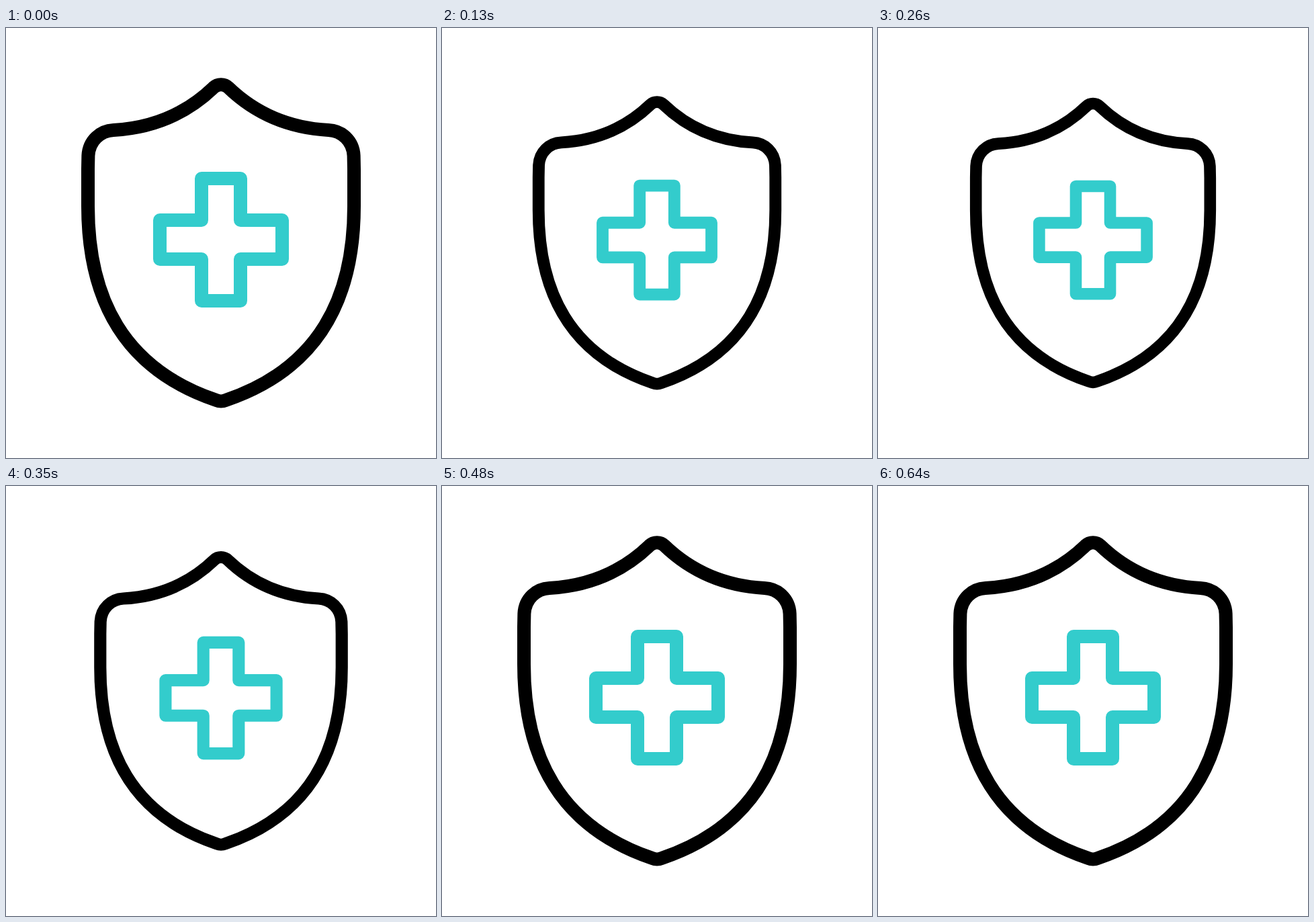
These frames come from a looping animation (640 by 640 pixels, 1510 ms). An HTML page:

```html
<!DOCTYPE html>
<html lang="en">
<head>
<meta charset="utf-8">
<title>Shield pulse</title>
<style>
  html, body { margin: 0; width: 100%; height: 100%; overflow: hidden; background: #fff; }
  svg { display: block; width: 100%; height: 100%; }
</style>
</head>
<body>
<svg viewBox="0 0 640 640">
  <g id="icon" fill="none" stroke-width="20" stroke-linejoin="round" stroke-linecap="round">
    <path stroke="#000" d="M309 88.6 C266 130 215 149 160 152 C140 153 123.5 168 122.4 190
      L122 210 V265 C122 402 174 507 313 554 Q320 557 327 554
      C466 507 518 402 518 265 V210 L517.6 190 C516.5 168 500 153 480 152
      C425 149 374 130 331 88.6 A16 16 0 0 0 309 88.6 Z"/>
    <path stroke="#33cccc" d="M291 224 H349 V286 H411 V344 H349 V406 H291 V344 H229 V286 H291 Z"/>
  </g>
</svg>
<script>
  const LOOP = 1510;
  const icon = document.getElementById('icon');

  // Fast at both ends, slow at the deepest point.
  function dip(x, start, low, end, depth) {
    if (x <= start || x >= end) return 0;
    const far = x < low
      ? Math.pow((low - x) / (low - start), 2.2)
      : Math.pow((x - low) / (end - low), 2.6);
    return depth * (1 - far);
  }

  // Poses advance every 32 ms on a 10 ms clock; each sixth one is held.
  function poseAt(t) {
    const tick = Math.ceil((Math.floor(t / 10) + 0.5) / 3.2) - 1;
    return tick - Math.floor(tick / 6);
  }

  function draw(t) {
    const pose = poseAt(t);
    const scale = 1 - dip(pose, 0, 6, 13, 0.1205) - dip(pose, 13, 15, 17, 0.0505);
    icon.setAttribute('transform', `translate(320 320) scale(${scale}) translate(-320 -320)`);
  }

  const begin = performance.now();
  function frame() {
    draw((performance.now() - begin) % LOOP);
    requestAnimationFrame(frame);
  }
  draw(0);
  requestAnimationFrame(frame);
</script>
</body>
</html>
```
